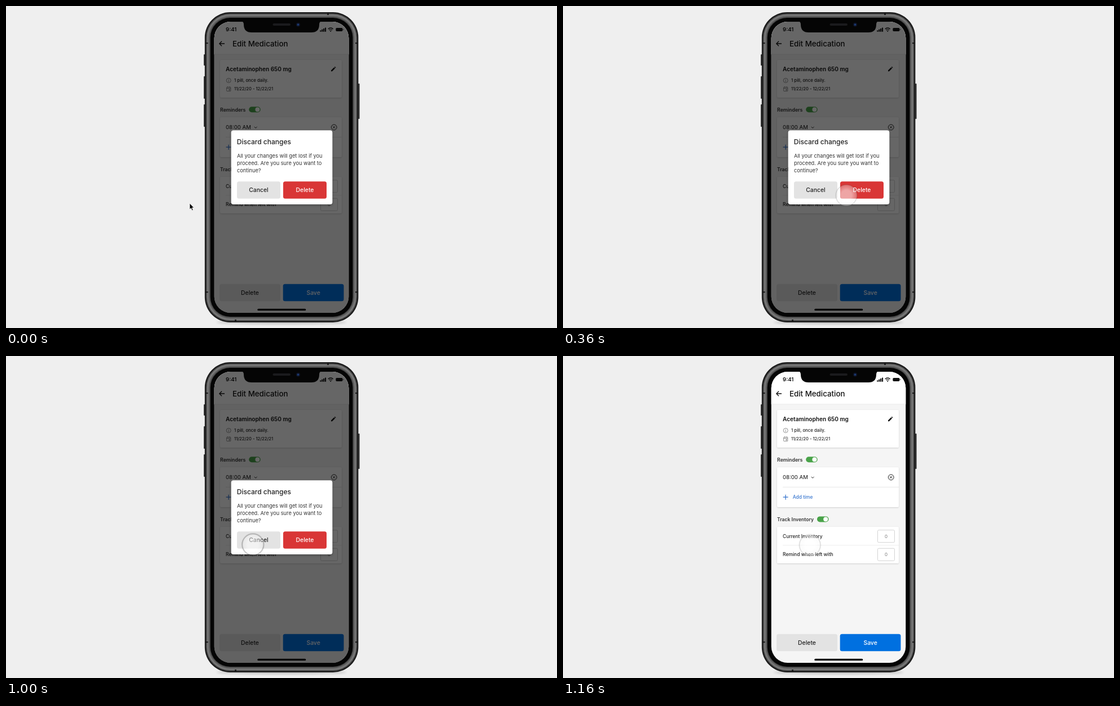
Animation of 978 by 573 pixels, one loop 1920 ms. Source, as an HTML page:

```html
<!DOCTYPE html>
<html lang="en">
<head>
<meta charset="utf-8">
<title>Discard changes</title>
<style>
  html, body { margin: 0; width: 100%; height: 100%; overflow: hidden; background: #efefef; }
  svg { display: block; width: 978px; height: 573px; }
  text { font-family: Inter, "Liberation Sans", sans-serif; }
</style>
</head>
<body>
<svg id="stage" viewBox="0 0 978 573" xmlns="http://www.w3.org/2000/svg"></svg>
<script>
const LOOP = 1920;
const STEP = 40;
const stage = document.getElementById('stage');

// Markup helpers
const rect = (x, y, w, h, r, fill, extra = '') =>
  `<rect x="${x}" y="${y}" width="${w}" height="${h}" rx="${r}" fill="${fill}" ${extra}/>`;
const circle = (x, y, r, fill, extra = '') =>
  `<circle cx="${x}" cy="${y}" r="${r}" fill="${fill}" ${extra}/>`;
const line = (d, color, width = 1) =>
  `<path d="${d}" fill="none" stroke="${color}" stroke-width="${width}"/>`;
const text = (label, x, midY, size, weight = 400, fill = '#111', anchor = 'start') =>
  `<text x="${x}" y="${midY + size * 0.36}" font-size="${size}" font-weight="${weight}" fill="${fill}" text-anchor="${anchor}">${label}</text>`;
const button = (label, x, y, w, h, fill, color) =>
  rect(x, y, w, h, 3.5, fill) + text(label, x + w / 2, y + h / 2, 10.4, 500, color, 'middle');
const card = (y, h) => rect(380, y, 216, h, 2, '#fff', 'filter="url(#cardShadow)"');
const toggle = (x, y) =>
  rect(x, y - 5, 20.5, 10, 5, '#49a349') + circle(x + 15.2, y, 4, '#fff');
const numberBox = y =>
  rect(558.5, y, 30, 22, 2, '#fff', 'stroke="#d2d2d2"') + text('0', 573.5, y + 11, 8, 400, '#777', 'middle');

const defs = `<defs>
  <clipPath id="screen">${rect(369.7, 28, 238.6, 518, 29, '#000')}</clipPath>
  <radialGradient id="glass">
    <stop offset=".5" stop-color="#fff" stop-opacity=".55"/>
    <stop offset="1" stop-color="#f4f4f4" stop-opacity=".3"/>
  </radialGradient>
  <filter id="cardShadow" x="-5%" y="-10%" width="110%" height="125%">
    <feDropShadow dx="0" dy=".8" stdDeviation="1" flood-opacity=".18"/>
  </filter>
  <filter id="dialogShadow" x="-10%" y="-10%" width="120%" height="125%">
    <feDropShadow dx="0" dy="1.5" stdDeviation="2" flood-opacity=".3"/>
  </filter>
  <filter id="blur" x="-10%" y="-200%" width="120%" height="500%"><feGaussianBlur stdDeviation="2"/></filter>
</defs>`;

function phoneBody() {
  // Concentric layers, each inset from the outer edge of the case
  const shell = (inset, fill) =>
    rect(352.8 + inset, 11 + inset, 272.6 - 2 * inset, 552 - 2 * inset, 45 - inset, fill);
  const sideButtons = [[351, 86, 20], [351, 125, 40], [351, 175, 40], [625, 138, 63]]
    .map(([x, y, h]) => rect(x, y, 2.6, h, 1, '#333')).join('');
  const bands = [[354, 65], [354, 508], [620, 65], [620, 508]]
    .map(([x, y]) => rect(x, y, 4.5, 2.2, 0, '#1a1a1a')).join('');
  return `<ellipse cx="489" cy="563" rx="116" ry="3" fill="#000" opacity=".2" filter="url(#blur)"/>`
    + sideButtons
    + shell(0, '#1c1c1c') + shell(2.4, '#505050') + shell(4, '#787878')
    + shell(6.5, '#626262') + shell(8.5, '#484848')
    + bands
    + rect(570, 12, 3, 4, 0, '#1a1a1a') + rect(406, 558, 3, 4, 0, '#1a1a1a')
    + shell(10, '#050505');
}

function statusBar() {
  const bars = [0, 1, 2, 3].map(i => {
    const h = 2.6 + i * 1.6;
    return rect(557.3 + i * 2.9, 45.8 - h, 2.1, h, 0.5, '#111');
  }).join('');
  const wifi = line('M571.8 40.9a6.2 6.2 0 0 1 8.8 0M573.6 42.9a3.7 3.7 0 0 1 5.2 0', '#111', 1.4)
    + '<path d="M574.8 44.4a2 2 0 0 1 2.8 0L576.2 46z" fill="#111"/>';
  const battery = rect(585.4, 38.9, 12, 6, 1.6, '#111') + rect(598, 40.8, 0.9, 2.2, 0.4, '#555');
  return text('9:41', 390, 42, 9.6, 600) + bars + wifi + battery;
}

function page() {
  return rect(369, 28, 240, 518, 0, '#f5f5f5')
    + rect(369, 28, 240, 57.5, 0, '#fff')
    + line('M369 85.8H609', '#e9e9e9', 0.8)
    + statusBar()
    + line('M388 67H379M383 62.7L378.8 67L383 71.3', '#111', 1.3)
    + text('Edit Medication', 402, 67.2, 13.3, 500)

    + card(96, 67)
    + text('Acetaminophen 650 mg', 390, 112.6, 10.1, 600)
    + '<path d="M577 116.3v-1.9l5.2-5.2 1.9 1.9-5.2 5.2zM582.8 108.6l.9-.9 1.9 1.9-.9.9z" fill="#111"/>'
    + circle(395.2, 132.5, 4, 'none', 'stroke="#777" stroke-width=".8"')
    + line('M395.2 131.8V135M395.2 130V131', '#777', 0.8)
    + text('1 pill, once daily.', 405, 132.4, 7.8, 500, '#222')
    + rect(391.6, 144.4, 7.2, 7.2, 0.8, 'none', 'stroke="#777" stroke-width=".8"')
    + line('M391.6 146.5H398.8M393.3 143.3V145M397.1 143.3V145', '#777', 0.9)
    + rect(395.5, 148.2, 2, 2, 0, '#777')
    + text('11/22/20 - 12/22/21', 405, 147.5, 7.6, 500, '#222')

    + text('Reminders', 380, 184.4, 8.8, 600, '#333') + toggle(431.2, 184.3)
    + card(198, 71)
    + text('08:00 AM', 390, 216, 9.6)
    + line('M440.8 215L443.2 217.2L445.6 215', '#222', 1)
    + circle(582.2, 215.8, 4.9, 'none', 'stroke="#222" stroke-width="1"')
    + line('M580.1 213.7L584.3 217.9M584.3 213.7L580.1 217.9', '#222', 1)
    + line('M390 233.3H596', '#e6e6e6', 0.9)
    + line('M390.6 251.2H399.6M395.1 246.7V255.7', '#2e6fcb', 1.2)
    + text('Add time', 407.7, 251.3, 8.4, 500, '#3a78d0')

    + text('Track Inventory', 380, 290.6, 8.6, 600, '#333') + toggle(451, 290.4)
    + card(304, 65)
    + text('Current Inventory', 390, 320.8, 8.4, 500, '#222') + numberBox(309.8)
    + line('M390 336.8H596', '#ececec', 0.9)
    + text('Remind when left with', 390, 353.4, 8.5, 500, '#222') + numberBox(342.3)

    + button('Delete', 379, 494.7, 108, 30.5, '#e3e3e3', '#222')
    + button('Save', 491.7, 494.7, 107.8, 30.5, '#0070e0', '#fff')
    + rect(446.3, 538.7, 86, 3.4, 1.7, '#000');
}

function dialog() {
  const lines = ['All your changes will get lost if you', 'proceed. Are you sure you want to', 'continue?'];
  return rect(399.7, 221.3, 179.6, 131.7, 4, '#fff', 'filter="url(#dialogShadow)"')
    + text('Discard changes', 409.8, 242, 12, 500, '#222')
    + lines.map((s, i) => text(s, 410, 266.6 + i * 12.9, 9.24, 400, '#333')).join('')
    + button('Cancel', 410, 312.2, 77, 30.6, '#e3e3e3', '#222')
    + button('Delete', 492, 312.2, 77, 30.6, '#d93636', '#fff');
}

const notch = '<path d="M418 27H560Q556 28 556 33Q556 47 542 47H436Q422 47 422 33Q422 28 418 27z" fill="#050505"/>'
  + rect(473.5, 31, 31.5, 4, 2, '#1b1b1d')
  + circle(518.5, 33.2, 3.4, '#10162a') + circle(518.5, 33.2, 1.6, '#1d3f7c');

stage.innerHTML = defs + phoneBody()
  + `<g clip-path="url(#screen)">${page()}${rect(369, 27, 240, 520, 0, '#000', 'id="scrim"')}</g>`
  + notch
  + `<g id="dialog">${dialog()}</g>`
  + `<path id="arrow" d="M0 0V11L2.5 8.8L4.3 13L6.2 12.2L4.4 8.1H7.6z" fill="#000" stroke="#fff" stroke-width=".8"/>`
  + `<g id="touch">${circle(0, 0, 19.2, 'none', 'id="halo" stroke="#000" stroke-width="2.2"')}
     ${circle(0, 0, 18.6, 'url(#glass)', 'stroke="#888" stroke-opacity=".4" stroke-width=".8"')}</g>`;

const [scrim, dialogBox, arrow, touch, halo] =
  ['scrim', 'dialog', 'arrow', 'touch', 'halo'].map(id => document.getElementById(id));

// Pointer positions, one per step, from rest to the Cancel button
const path = [[326, 351], [340, 350], [366, 346], [402.5, 342], [462, 338], [503, 337], [470, 337], [438.3, 336.5]];
const PHONE_EDGE = 352;

const clamp = v => Math.min(1, Math.max(0, v));
const smooth = v => v * v * (3 - 2 * v);

function draw(now) {
  const t = Math.floor((now % LOOP) / STEP) * STEP;

  const index = Math.min(path.length - 1, Math.max(0, t / STEP - 4));
  const [x, y] = path[index];
  const isTouch = x > PHONE_EDGE;
  const press = clamp((t - 720) / 160) * (1 - clamp((t - 1080) / 80));
  const place = `translate(${x} ${y - press})`;
  arrow.setAttribute('transform', place);
  touch.setAttribute('transform', place);
  arrow.setAttribute('visibility', isTouch ? 'hidden' : 'visible');
  touch.setAttribute('visibility', isTouch ? 'visible' : 'hidden');
  halo.setAttribute('stroke-opacity', 0.04 + 0.14 * press);

  const leave = smooth(clamp((t - 1056) / 104));
  const scale = 1 + 0.108 * leave;
  scrim.setAttribute('opacity', 0.6 * (1 - leave));
  dialogBox.setAttribute('opacity', 1 - leave);
  dialogBox.setAttribute('transform', `translate(489.5 287) scale(${scale}) translate(-489.5 -287)`);
}

const start = performance.now();
function tick() {
  draw(performance.now() - start);
  requestAnimationFrame(tick);
}
tick();
</script>
</body>
</html>
```
